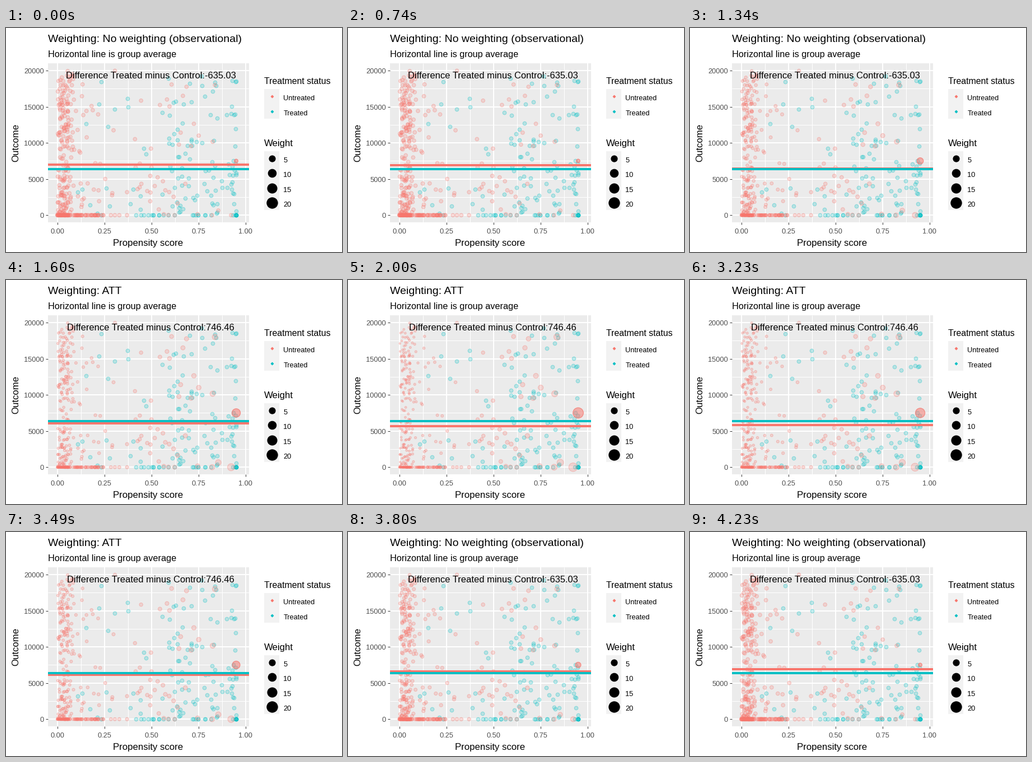
Recreate the animation shown at these times as a matplotlib script. Size 600 px wide and 400 px high, loop 4290 ms.

```python
import matplotlib.pyplot as plt
import numpy as np
from matplotlib.animation import FuncAnimation
from matplotlib.colors import to_rgba
from matplotlib.patches import Rectangle

PT = 0.72  # points per pixel at 100 dpi
RED, TEAL = "#F8766D", "#00BFC4"
LEFT, RIGHT, TOP, BOTTOM = 75, 434, 63, 347
LOOP, STEP = 4290, 30
HOLD, MOVE = LOOP / 6, LOOP / 3
MEAN_FROM, MEAN_TO, TREATED_MEAN = 244.493, 261.8, 252

plt.rcParams["font.family"] = "Liberation Sans"
fig = plt.figure(figsize=(6, 4), dpi=100, facecolor="white")
ax = fig.add_axes([0, 0, 1, 1])
ax.set(xlim=(0, 600), ylim=(400, 0))
ax.axis("off")


def sx(score):
    return 91.5 + 336 * score


def sy(outcome):
    return 334.3 - outcome * 0.01292


def line(xs, ys, color, width, z):
    return ax.plot(xs, ys, color=color, lw=width * PT, zorder=z,
                   solid_capstyle="butt")[0]


def label(x, y, text, size, color="black", ha="left", **kw):
    return ax.text(x, y, text, fontsize=size * PT, color=color, ha=ha,
                   va="baseline", zorder=9, **kw)


def box(x0, y0, x1, y1, color):
    ax.add_patch(Rectangle((x0, y0), x1 - x0, y1 - y0, fc=color, lw=0, zorder=0))


def diameter(weight):
    size = 1 + 5 * np.sqrt(np.clip(weight / 20.4, 0, 1))
    return 3.3 * size - 0.4


def area(d):
    return (d * PT) ** 2


def dots(x, y, d, color, fill=1, rim=1, z=3, marker="o"):
    return ax.scatter(x, y, s=area(d), fc=to_rgba(color, fill), marker=marker,
                      ec=to_rgba(color, rim), lw=1.1 * PT, zorder=z)


# panel, grid and axes
box(LEFT, TOP, RIGHT, BOTTOM, "#EBEBEB")
for k in range(9):
    x, y, major = sx(k / 8), sy(k * 2500), k % 2 == 0
    width = 2 if major else 1
    line([x, x], [TOP, BOTTOM], "white", width, 1)
    line([LEFT, RIGHT], [y, y], "white", width, 1)
    if major:
        line([x, x], [BOTTOM, BOTTOM + 4], "#333333", 1, 1)
        line([LEFT - 4, LEFT], [y, y], "#333333", 1, 1)
        label(x, 367, f"{k / 8:.2f}", 12.8, "#4D4D4D", "center")
        label(68, y + 5, f"{k * 2500}", 12.8, "#4D4D4D", "right")

label(254, 389, "Propensity score", 16.7, ha="center")
label(22, 205, "Outcome", 16.7, ha="center", rotation=90, rotation_mode="anchor")
title = label(75, 25, "", 19.5)
label(75, 52, "Horizontal line is group average", 16.25)
note = label(258.5, 90, "", 16.45, ha="center")

# legends
label(461, 100, "Treatment status", 15.9)
box(461, 109, 488, 162, "#F2F2F2")
for y, name, color in ((122, "Untreated", RED), (149, "Treated", TEAL)):
    dots(475, y, 3.2, color, marker="D")
    label(495.5, y + 7, name, 12.7)
label(461, 211, "Weight", 16.7)
box(461, 220, 488, 325, "#F2F2F2")
for k, w in enumerate((5, 10, 15, 20)):
    y = 233 + 26.4 * k
    dots(475, y, diameter(w), "black")
    label(495.5, y + 7, str(w), 12.8)

# simulated sample: low scores for the untreated, higher ones for the treated
rng = np.random.default_rng(7)


def people(scores, skew):
    return np.column_stack([scores, 20000 * rng.random(len(scores)) ** skew])


def idle(scores):
    return np.column_stack([scores, np.zeros(len(scores))])


heavy = [(0.951, 7500)] * 3 + [
    (0.924, 0), (0.838, 18000), (0.826, 10150), (0.752, 11000), (0.668, 16500),
    (0.856, 650), (0.823, 0), (0.746, 150), (0.687, 17750)]
untreated = np.vstack([
    people(rng.uniform(0.003, 0.06, 150), 1.2),
    people(0.055 + rng.exponential(0.045, 55).clip(0, 0.2), 1.2),
    people(rng.uniform(0.18, 0.75, 42), 1.9),
    idle(rng.exponential(0.11, 95).clip(0, 0.65)),
    heavy])
treated = np.vstack([
    people(rng.uniform(0.1, 0.5, 20), 1.3),
    people(rng.normal(0.65, 0.06, 48), 1.2),
    people(rng.normal(0.84, 0.03, 24), 1.3),
    people(0.952 - rng.exponential(0.012, 26).clip(0, 0.05), 1.3),
    idle(rng.uniform(0.4, 0.95, 22)),
    idle(np.full(6, 0.951))])

score = untreated[:, 0].clip(0.001, 0.96)
plain = np.full(len(score), diameter(1))
weighted = diameter(score / (1 - score))

dots(sx(treated[:, 0]), sy(treated[:, 1]), diameter(1), TEAL, 0.22, 0.35)
control = dots(sx(untreated[:, 0]), sy(untreated[:, 1]), plain, RED, 0.22, 0.35, 4)
control_mean = line([LEFT, RIGHT], [MEAN_FROM] * 2, RED, 4, 5)
line([LEFT, RIGHT], [TREATED_MEAN] * 2, TEAL, 4, 6)


def progress(t):
    """Share of the weighted state: hold, ease over, hold, ease back."""
    back = t >= LOOP / 2
    p = max(0, (t % (LOOP / 2) - HOLD) / MOVE)
    eased = (1 - np.cos(np.pi * p)) / 2
    return 1 - eased if back else eased


def update(i):
    k = progress((i + 0.5) * STEP)
    control.set_sizes(area(plain + (weighted - plain) * k))
    control_mean.set_ydata([MEAN_FROM + (MEAN_TO - MEAN_FROM) * k] * 2)
    att = k >= 0.5
    title.set_text("Weighting: " + ("ATT" if att else "No weighting (observational)"))
    note.set_text("Difference Treated minus Control:" + ("746.46" if att else "-635.03"))
    return control, control_mean, title, note


anim = FuncAnimation(fig, update, frames=LOOP // STEP, interval=STEP,
                     repeat=True, repeat_delay=0, blit=False)
plt.show()
```
